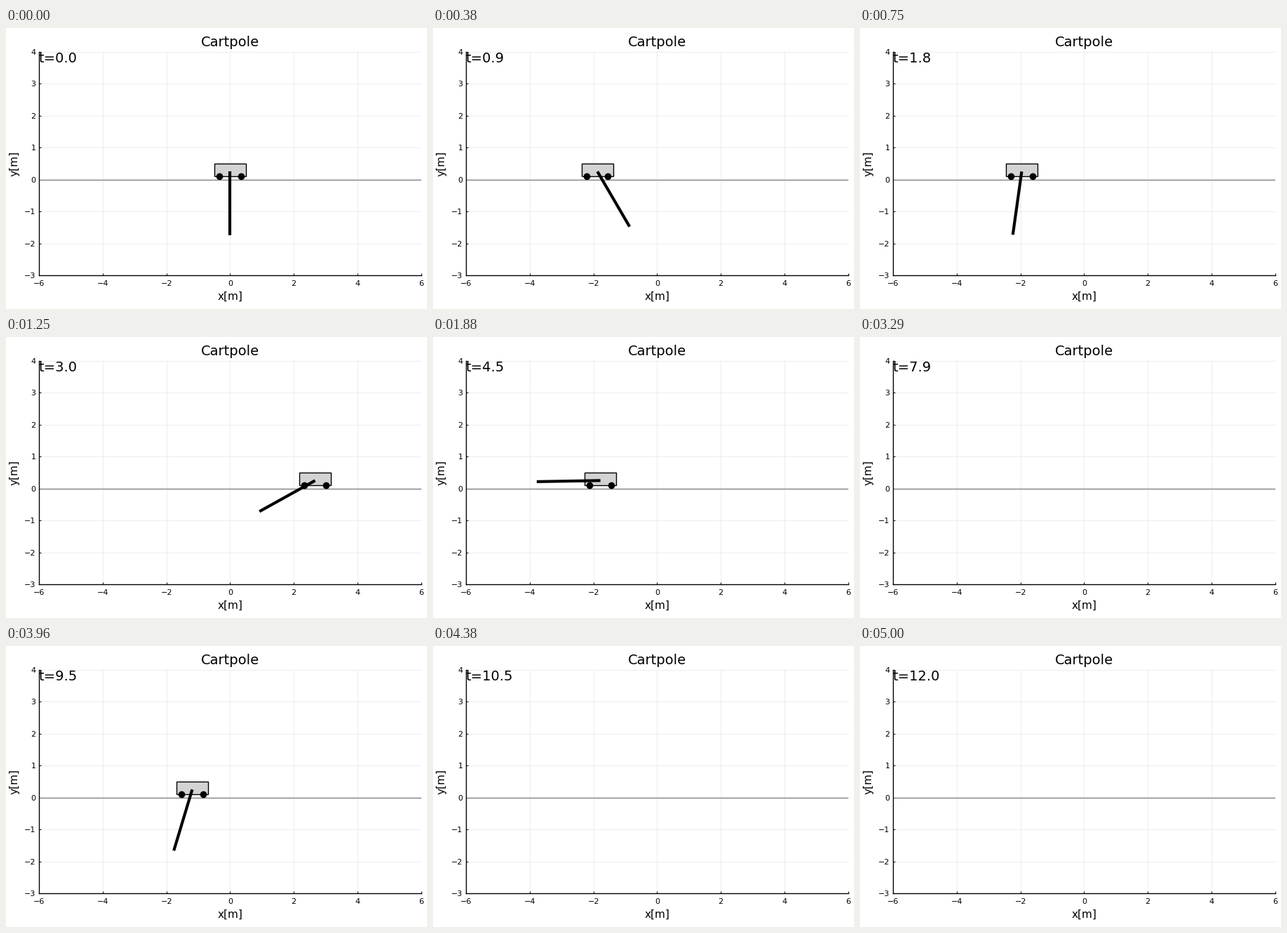
Write a matplotlib script that moves like this. It is 600x400 px and loops after 5.04 s.

```python
import numpy as np
import matplotlib.pyplot as plt
from matplotlib.animation import FuncAnimation
from matplotlib.patches import Rectangle

W, H, DPI = 600, 400, 100
LEFT, RIGHT, TOP, BOTTOM = 47.1, 591.7, 34.0, 351.94
INTERVAL, LOOP, FPS = 20, 5040, 24
STEPS, DT = 121, 0.1
PIVOT, POLE = 0.25, 2.0

plt.rcParams["font.family"] = "DejaVu Sans"

# swing-up poses: time [s], cart [m], pole angle from straight down [deg]
SWING = np.array([
    (0, 0, 0), (0.6, -1.05, 26), (1.2, -2.5, 27), (1.8, -1.96, -8),
    (2.5, 0.5, -77), (3.0, 2.67, -61), (3.4, 2.75, 20), (3.9, 0.38, 148),
    (4.5, -1.78, 271), (5.2, -6.55, 473), (5.6, -9.6, 560)])


def swing(t):
    """Smooth curve through the swing-up poses, starting at rest."""
    kt, pose = SWING[:, 0], SWING[:, 1:]
    slope = np.gradient(pose, kt, axis=0)
    slope[0] = 0
    t = np.clip(t, kt[0], kt[-1])
    i = np.clip(np.searchsorted(kt, t, side="right") - 1, 0, len(kt) - 2)
    h = (kt[i + 1] - kt[i])[:, None]
    s = (t - kt[i])[:, None] / h
    return (pose[i] + s * s * (3 - 2 * s) * (pose[i + 1] - pose[i])
            + s * (1 - s) * h * ((1 - s) * slope[i] - s * slope[i + 1])).T


def crossing(t):
    """Fast return from left to right at constant speed."""
    return -1.19 + 10.4 * (t - 9.5), -16.8 + 75 * (t - 9.5)


times = np.arange(STEPS) * DT
cart_x, angle = np.where(times < 7, swing(times), crossing(times))
theta = np.radians(angle)

fig = plt.figure(figsize=(W / DPI, H / DPI), dpi=DPI, facecolor="white")
ax = fig.add_axes([LEFT / W, 1 - BOTTOM / H,
                   (RIGHT - LEFT) / W, (BOTTOM - TOP) / H])
ax.set(xlim=(-6, 6), ylim=(-3, 4),
       xticks=range(-6, 7, 2), yticks=range(-3, 5))
ax.set_axisbelow(True)
ax.grid(color="black", alpha=0.1, lw=0.5)
ax.tick_params(direction="in", length=2.2, width=0.7,
               labelbottom=False, labelleft=False)
ax.spines[["top", "right"]].set_visible(False)
ax.spines[["left", "bottom"]].set_linewidth(1)


def put(x, y, text, size, ha="center", **kw):
    """Place text with its baseline at a pixel position."""
    return fig.text(x / W, 1 - y / H, text, fontsize=size, ha=ha,
                    va="baseline", **kw)


def signed(v):
    return str(v).replace("-", "\u2212")


for v in range(-6, 7, 2):
    put(LEFT + (v + 6) * (RIGHT - LEFT) / 12, 367, signed(v), 8)
for v in range(-3, 5):
    put(42.5, TOP + (4 - v) * (BOTTOM - TOP) / 7 + 4, signed(v), 8, "right")
put(319.6, 26, "Cartpole", 14)
put(319.6, 387, "x[m]", 11)
put(16, 193, "y[m]", 11, rotation=90, rotation_mode="anchor")
clock = put(46.9, 49, "", 14, "left")

ax.axhline(0, color="gray", lw=1, zorder=2)
body = ax.add_patch(Rectangle((-0.5, 0.1), 1, 0.4, fc="lightgray",
                              ec="black", lw=1, zorder=3))
wheels, = ax.plot([], [], "o", color="black", ms=7, mew=0, zorder=4)
pole, = ax.plot([], [], color="black", lw=3, solid_capstyle="butt", zorder=5)


def update(k):
    n = min(int((k * INTERVAL + INTERVAL - 1) * FPS / 1000), STEPS - 1)
    x, a = cart_x[n], theta[n]
    body.set_x(x - 0.5)
    wheels.set_data([x - 1 / 3, x + 1 / 3], [0.1, 0.1])
    pole.set_data([x, x + POLE * np.sin(a)], [PIVOT, PIVOT - POLE * np.cos(a)])
    clock.set_text(f"t={times[n]:.1f}")
    return body, wheels, pole, clock


anim = FuncAnimation(fig, update, frames=LOOP // INTERVAL, interval=INTERVAL,
                     repeat=True, repeat_delay=0, blit=False)
plt.show()
```
